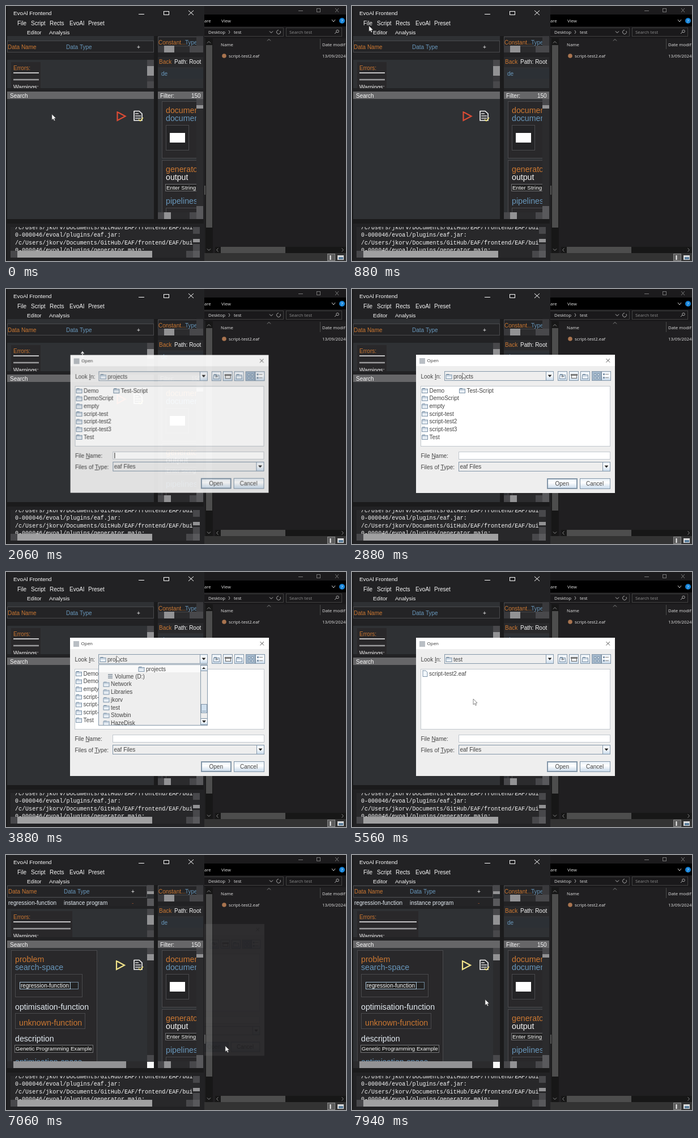
An HTML page with a canvas for the animation above (8000 ms loop, 600x450 px).

```html
<!DOCTYPE html>
<html lang="en">
<head>
<meta charset="utf-8">
<title>Opening a project</title>
<style>
  html, body { margin: 0; width: 100%; height: 100%; overflow: hidden; background: #1b1b1c; }
  canvas { display: block; width: 600px; height: 450px; }
</style>
</head>
<body>
<canvas id="stage" width="600" height="450"></canvas>
<script>
const LOOP = 8000;
const SANS = '"Liberation Sans", Arial, sans-serif';
const MONO = '"Liberation Mono", monospace';
const UI = '"Open Sans", sans-serif';
const ORANGE = '#cc7832', BLUE = '#6897bb', WHITE = '#f8f8f8';
const DARK = '#222224', PANEL = '#2f3134', CARD = '#29282a', EDGE = '#4a4a4d';
const THUMB = '#929294', TRACK = '#48484b', CORNER = '#59595c';
const STEEL = '#8497a9', PALE = '#c2c8ce', SELECT = '#a3b8cc', INK = '#444', ICON = '#7d93a8';

const screen = document.getElementById('stage').getContext('2d', { alpha: false });
const layer = Object.assign(document.createElement('canvas'), { width: 600, height: 450 }).getContext('2d');
let g = screen;

// Drawing helpers; boxes are given by two corners
function box(x0, y0, x1, y1, fill, edge, width = 1) {
  if (fill) { g.fillStyle = fill; g.fillRect(x0, y0, x1 - x0, y1 - y0); }
  if (edge) {
    g.strokeStyle = edge; g.lineWidth = width;
    g.strokeRect(x0 + .5, y0 + .5, x1 - x0 - 1, y1 - y0 - 1);
  }
}
function text(string, x, middle, color = WHITE, size = 10, family = SANS) {
  g.font = `${size}px ${family}`;
  g.fillStyle = color;
  g.fillText(string, x, middle + size * .36);
}
function line(points, color, width = 1, fill) {
  g.beginPath();
  for (let i = 0; i < points.length; i += 2) g.lineTo(points[i], points[i + 1]);
  if (fill) { g.closePath(); g.fillStyle = fill; g.fill(); }
  if (color) { g.strokeStyle = color; g.lineWidth = width; g.stroke(); }
}
function disc(x, y, r, color) {
  g.beginPath(); g.arc(x, y, r, 0, 7); g.fillStyle = color; g.fill();
}
function clipped(x0, y0, x1, y1, draw) {
  g.save(); g.beginPath(); g.rect(x0, y0, x1 - x0, y1 - y0); g.clip(); draw(); g.restore();
}
const chevron = (x, y, dx, dy, color = '#8a8a8a') =>
  line(dx ? [x - dx, y - 3, x + dx, y, x - dx, y + 3] : [x - 3, y - dy, x, y + dy, x + 3, y - dy], color);
const arrowDown = (x, y) => line([x - 3.5, y - 2, x + 3.5, y - 2, x, y + 2], null, 1, '#222');

function fileManager() {
  const label = (s, x, y, color = '#e4e4e4') => text(s, x, y, color, 7.8, UI);
  box(349, 0, 600, 450, '#201f21');
  box(349, 0, 600, 36, '#000');
  box(349, 0, 600, 15, '#1c1b1d');
  line([516, 8.5, 524, 8.5], '#777');
  box(548, 4, 555, 11, null, '#777');
  line([581, 4, 587, 11], '#777'); line([587, 4, 581, 11], '#777');
  label('are', 350, 26); label('View', 380, 26);
  chevron(578, 26, 0, 2, '#ccc');
  disc(593, 26, 5, '#1683d8'); label('?', 591.3, 26, '#fff');

  box(349, 36, 600, 57, '#1a191b');
  box(349, 38, 490, 54, '#1a191b', '#414141');
  box(494, 38, 593, 54, '#1a191b', '#414141');
  label('Desktop', 357, 46); chevron(394, 46, 1, 0, '#aaa'); label('test', 402, 46);
  chevron(468, 46, 0, 1.5, '#bbb');
  g.beginPath(); g.arc(481, 46, 3.5, -.6, 4.7); g.strokeStyle = '#aaa'; g.stroke();
  label('Search test', 500, 46, '#8e8e8e');
  g.beginPath(); g.arc(585, 44.5, 2.3, 0, 7); g.stroke();
  line([583, 46, 580, 49], '#aaa');

  chevron(464, 60, 0, -1.5);
  label('Name', 379, 68); label('Date modif', 558, 68);
  line([554.5, 58, 554.5, 76], '#4a4a4a');
  disc(385, 88, 3.8, '#a9744f');
  label('script-test2.eaf', 393, 88); label('13/09/2024', 558, 88);

  box(352, 57, 365, 436, '#171717');
  box(353, 69, 364, 391, '#4d4d4d');
  chevron(358, 64, 0, -1.5); chevron(358, 430, 0, 1.5);
  box(369, 425, 600, 436, '#171717');
  box(379, 425, 493, 436, '#4d4d4d');
  chevron(373, 430.5, -1.5, 0); chevron(594, 430.5, 1.5, 0);
  box(349, 436, 600, 450, '#333');
  box(567, 437, 581, 450, '#5c5c5c', '#888');
  line([572.5, 440, 572.5, 448], '#eee', 2);
  box(585, 440, 596, 448, '#ddd'); box(587, 443, 595, 447, '#5c7f9c');
  box(349, 317, 352, 333, '#555');
}

function cards(loaded) {
  box(2, 164, 261, 376, PANEL);
  if (loaded) {
    clipped(2, 164, 249, 364, () => {
      box(9, 168, 161, 380, CARD, EDGE);
      text('problem', 16, 184, ORANGE, 14.2);
      text('search-space', 16, 198, BLUE, 14.2);
      box(16, 210, 135, 251, null, EDGE);
      box(24, 224, 128, 237, '#222', '#6f8799');
      box(24, 224, 114, 237, null, '#a9c4d8');
      text('regression-function', 26, 230);
      text('optimisation-function', 16, 268, '#e3ebf2', 14.2);
      box(16, 279, 140, 307, null, EDGE);
      text('unknown-function', 23, 296, ORANGE, 14.2);
      text('description', 16, 324, '#e3ebf2', 14.2);
      box(15, 335, 154, 349, '#222', '#737376');
      text('Genetic Programming Example', 17, 342, WHITE, 9.7);
      text('optimisation-space', 16, 365, BLUE, 14.2);
    });
    box(249, 164, 261, 376, '#2b2b2d');
    box(249, 164, 261, 175, TRACK);
    box(249, 175, 261, 186, THUMB);
    box(249, 353, 261, 365, TRACK);
    box(2, 364, 249, 376, '#2b2b2d');
    box(13, 364, 212, 376, THUMB);
    box(249, 365, 261, 376, WHITE);
  }
  const x = loaded ? 195 : 196.5;
  line([x, 187, x + 14, 194.5, x, 202, x, 186], loaded ? '#f2e48a' : '#dc4b35', 2.2);
  line([226, 185.5, 235, 185.5, 240, 190, 240, 202, 226, 202, 226, 185], WHITE, 1.6);
  for (const y of [190, 194, 198]) line([228, y, y < 191 ? 234 : 238, y], WHITE, 1.3);
  line([234, 200, 237, 203, 242, 197], '#e8d96a', 1.5);
}

function table(loaded) {
  if (!loaded) {
    box(2, 53, 261, 82, PANEL);
    box(2, 61, 261, 82, '#242426', EDGE);
    text('Data Name', 3, 72, ORANGE); text('Data Type', 106, 72, BLUE); text('+', 231, 72);
    return;
  }
  box(2, 53, 261, 90, PANEL);
  box(2, 54, 249, 75, '#242426', EDGE);
  box(2, 76, 249, 90, '#242426');
  text('Data Name', 4, 64, ORANGE); text('Data Type', 102, 64, BLUE); text('+', 221, 64);
  text('regression-function', 4, 84, '#e3ebf2'); text('instance program', 102, 84, '#e3ebf2');
  text('-', 222, 84, '#94512f');
  box(249, 53, 261, 64, TRACK);
  box(249, 64, 261, 69, THUMB);
  box(249, 77, 261, 90, CORNER);
}

function mainWindow(loaded) {
  box(0, 0, 350, 450, DARK);
  box(0, 0, 2, 450, '#171718');
  text('EvoAl Frontend', 13, 12, WHITE, 9.8);
  line([234, 14.5, 244, 14.5], '#fff');
  box(278, 9, 288, 16, null, '#fff');
  line([322, 8, 331, 16], '#fff'); line([331, 8, 322, 16], '#fff');
  [['File', 20], ['Script', 44], ['Rects', 77], ['EvoAl', 112], ['Preset', 145]]
    .forEach(([s, x]) => text(s, x, 30));
  text('Editor', 37, 46, WHITE, 9.8); text('Analysis', 76, 46, WHITE, 9.8);
  box(261, 53, 268, 376, '#1b1b1c');
  table(loaded);

  const right = loaded ? 117 : 61;
  box(2, 95, 261, 145, PANEL);
  box(9, 99, right, 145, CARD);
  text('Errors:', 13, 109, ORANGE);
  line([13, 118, right - 3, 118], WHITE, 1.5);
  line([13, 130, right - 3, 130], '#9a9a9c', 2.4);
  clipped(2, 95, 249, 145, () => text('Warnings:', 13, 143));
  box(249, 95, 261, 145, '#39393c');
  box(249, 95, 261, 106, TRACK); box(249, 106, 261, 123, THUMB); box(249, 133, 261, 145, TRACK);

  box(2, 151, 261, 164, '#666668'); text('Search', 7, 158);
  cards(loaded);

  box(268, 53, 348, 82, '#2b2b2d');
  box(268, 54, 337, 71, '#242426', EDGE);
  clipped(268, 53, 336, 71, () => {
    text('Constant...', 269, 64, ORANGE); text('Type', 316, 64, BLUE);
  });
  box(336, 53, 348, 70, '#39393c');
  box(268, 70, 279, 82, '#39393c'); box(279, 70, 297, 82, THUMB); box(324, 70, 348, 82, TRACK);
  box(268, 90, 348, 108, '#29292b');
  text('Back', 270, 98, ORANGE); text('Path: Root', 297, 98);
  box(268, 108, 348, 145, PANEL);
  box(271, 111, 348, 128, '#2c3035'); text('de', 274, 119, BLUE);

  box(268, 151, 348, 164, '#666668'); text('Filter:', 272, 158); text('150', 327, 158);
  box(268, 164, 348, 376, PANEL);
  clipped(268, 164, 336, 364, () => {
    box(275, 168, 360, 269, CARD, EDGE);
    text('document', 282, 184, ORANGE, 14.2); text('document', 282, 198, BLUE, 14.2);
    box(282, 210, 323, 255, '#242426', EDGE); box(289, 224, 316, 241, '#fff');
    box(275, 272, 360, 380, CARD, EDGE);
    text('generator', 282, 288, ORANGE, 14.2); text('output', 282, 302, WHITE, 14.2);
    box(281, 314, 350, 327, '#222', '#707073'); text('Enter String', 283, 320.5, WHITE, 9.9);
    text('pipelines', 282, 344, BLUE, 14.2);
    box(282, 356, 350, 380, null, EDGE);
  });
  box(336, 164, 348, 376, '#2b2b2d');
  box(336, 164, 348, 175, TRACK); box(336, 175, 348, 181, THUMB);
  box(268, 364, 348, 376, '#2b2b2d');
  box(268, 364, 279, 376, TRACK); box(279, 364, 291, 376, THUMB);
  box(324, 364, 348, 376, TRACK); box(336, 353, 348, 376, CORNER);

  box(2, 376, 349, 384, '#1b1b1c');
  box(8, 390, 342, 444, '#28282a');
  clipped(8, 390, 330, 432, () => {
    const path = '/c/Users/jkorv/Documents/GitHub/EAF/frontend/EAF/bui';
    [path, '0-000046/evoal/plugins/eaf.jar:', path, '0-000046/evoal/plugins/generator.main:']
      .forEach((s, i) => text(s, 16, 390.5 + 13.3 * i, WHITE, 10.05, MONO));
  });
  box(330, 390, 342, 402, TRACK); box(330, 411, 342, 417, THUMB); box(330, 420, 342, 432, TRACK);
  box(8, 432, 20, 444, TRACK); box(20, 432, 258, 444, '#a0a0a1');
  box(318, 432, 330, 444, TRACK); box(330, 432, 342, 444, CORNER);
}

function fileMenu(cursorY) {
  const items = ['new', 'new from preset', 'open recent', 'open', 'save as ...', 'save', 'import ...', 'add generator to project'];
  const hover = Math.floor((cursorY - 40) / 14.35);
  box(16, 23, 41, 38, SELECT); text('File', 20, 30);
  box(16, 38, 136, 156, '#eee', STEEL);
  items.forEach((item, i) => {
    const y = 47 + 14.35 * i;
    if (i === hover) box(17, Math.round(y - 7), 135, Math.round(y + 7), SELECT);
    text(item, 21, y, INK);
  });
  line([129, 72.5, 132, 75.5, 129, 78.5], null, 1, '#222');
}

function folder(x, y) {
  box(x + 1, y - 4, x + 6, y, '#c9d6e2', ICON);
  box(x, y - 3, x + 11, y + 5, '#eaf0f6', ICON);
  line([x + 1, y - .5, x + 10, y - .5], '#b4c4d4');
}
function entry(name, x, y) { folder(x, y); text(name, x + 13.5, y, INK); }

function button(x0, y0, x1, y1, pressed) {
  const shade = g.createLinearGradient(0, y0, 0, y1);
  shade.addColorStop(0, '#e3ecf5'); shade.addColorStop(.4, '#fff'); shade.addColorStop(1, '#c4d7e9');
  box(x0, y0, x1, y1, pressed ? SELECT : shade, STEEL);
}
function combo(x0, y0, x1, y1) {
  box(x0, y0, x1, y1, '#eee', STEEL);
  button(x1 - 14, y0, x1, y1);
  arrowDown(x1 - 7, (y0 + y1) / 2);
}

function lookInList(cursorY) {
  box(163, 163, 356, 271, '#eee', STEEL);
  box(164, 164, 343, 177, '#fafafa');
  clipped(164, 164, 343, 270, () => {
    if (cursorY > 231) box(164, 232, 343, 246, SELECT);
    entry('projects', 233.5, 171);
    box(180, 180, 188, 188, '#9aa3ac');
    line([180, 182.5, 188, 182.5], '#e8eef4'); line([180, 185.5, 188, 185.5], '#e8eef4');
    text('Volume (D:)', 192, 184, INK);
    ['Network', 'Libraries', 'jkorv', 'test', 'Stowbin', 'HazeDisk']
      .forEach((s, i) => entry(s, 171.5, 197.7 + 13.75 * i));
  });
  box(343, 164, 356, 270, '#eee', STEEL);
  button(343, 164, 356, 175); button(343, 258, 356, 270);
  box(344, 233, 355, 249, '#cfdfee', STEEL);
  line([346, 171, 352, 171, 349, 168], null, 1, '#222'); arrowDown(349.5, 264);
  line([346, 245.5, 353, 245.5], STEEL);
}

function dialog(t, cursorY) {
  const inTest = t >= 4800, chosen = t >= 6150;
  box(113, 116, 464, 360, '#eee');
  box(113, 116, 464, 136, '#fff');
  box(119, 122, 129, 132, '#b9bec4');
  text('Open', 132.5, 126.5, '#333', 8, UI);
  line([448.5, 123, 455, 129.5], '#555'); line([455, 123, 448.5, 129.5], '#555');

  text('Look In:', 121.5, 154, INK); line([146, 159.5, 149, 159.5], INK);
  combo(163, 145, 356, 162);
  entry(inTest ? 'test' : 'projects', 165.5, 154);
  [363, 383, 403, 423, 440].forEach((x, i) => button(x, 145, x + 17, 162, i === 3));
  folder(366, 154); line([371, 156, 371, 152.5, 374, 155], '#555');
  box(387, 152, 397, 158, '#f4f4f4', '#666'); box(386, 150, 398, 153, '#999', '#666');
  folder(406, 154);
  for (const x of [427, 433]) for (const y of [149, 155]) box(x, y, x + 4, y + 4, '#e4edf5', ICON);
  for (const y of [150, 156]) { box(443, y - 1, 446, y + 2, ICON); line([447, y + .5, 453, y + .5], '#888'); }

  box(121, 171, 456, 278, '#fff', PALE);
  if (inTest) {
    if (chosen) box(135, 173, 204, 186, '#b8cfe5');
    line([125, 174, 130, 174, 133, 177, 133, 184.5, 125, 184.5, 125, 173.5], ICON, 1, '#f2f7fc');
    text('script-test2.eaf', 136, 179, INK);
  } else {
    ['Demo', 'DemoScript', 'empty', 'script-test', 'script-test2', 'script-test3', 'Test']
      .forEach((s, i) => entry(s, 123, 179 + 13.65 * i));
    entry('Test-Script', 189, 179);
  }

  text('File Name:', 121.5, 294, INK); line([140.5, 299.5, 147, 299.5], INK);
  box(188, 287, 456, 301, '#fff', PALE);
  if (chosen) text('script-test2.eaf', 191, 294, INK);
  else if (t < 2500) line([191.5, 289, 191.5, 299], '#222');
  text('Files of Type:', 121.5, 314, INK); line([156, 319.5, 162, 319.5], INK);
  combo(188, 305, 456, 322);
  text('eaf Files', 190.5, 313.5, INK);
  button(344, 334, 398, 353, t > 6820); box(345, 335, 397, 352, null, STEEL);
  text('Open', 358.5, 343.5, INK);
  button(402, 334, 456, 353); text('Cancel', 413, 343.5, INK);
  if (t >= 3300 && !inTest) lookInList(cursorY);
}

function fadedDialog(t, amount, cursorY) {
  g = layer;
  g.clearRect(0, 0, 600, 450);
  dialog(t, cursorY);
  g = screen;
  const scale = .95 + .05 * amount;
  g.save();
  g.globalAlpha = amount;
  g.translate(288.5, 238); g.scale(scale, scale); g.translate(-288.5, -238);
  g.drawImage(layer.canvas, 0, 0);
  g.restore();
}

// time, x, y of the pointer
const stops = [
  [0, 81, 191], [350, 81, 191], [950, 28, 29], [1250, 28, 30], [1700, 45, 86], [1900, 45, 86],
  [2060, 135, 116], [2900, 195, 148], [4000, 195, 148], [4550, 195, 237], [4850, 195, 237],
  [5250, 214, 224], [5600, 214, 224], [6000, 165, 178], [6200, 165, 178], [6650, 387, 337],
  [7080, 387, 337], [7650, 235, 255], [8000, 235, 255]
];
function pointerAt(t) {
  const i = stops.findIndex(s => s[0] > t);
  const [t0, x0, y0] = stops[i - 1], [t1, x1, y1] = stops[i];
  const p = (t - t0) / (t1 - t0), ease = p * p * (3 - 2 * p);
  return [x0 + (x1 - x0) * ease, y0 + (y1 - y0) * ease];
}
function pointer(x, y, resizing) {
  g.save();
  g.translate(x, y);
  if (resizing) line([-2.5, -2, 0, -5, 2.5, -2, 0, -5, 0, 5, -2.5, 2, 0, 5, 2.5, 2], WHITE, 1.2);
  else line([0, 0, 0, 10, 2.3, 8, 4, 11.5, 5.6, 10.7, 4, 7.3, 7, 7, 0, 0], '#555', .7, '#fff');
  g.restore();
}

function draw(now) {
  const t = now % LOOP, [x, y] = pointerAt(t);
  const closing = t >= 6920;
  const shown = Math.max(0, Math.min(1, (t - 1920) / 150, (7070 - t) / 150));
  fileManager();
  // The main window comes to the front as the dialog closes
  if (closing && shown) fadedDialog(t, shown, y);
  mainWindow(closing);
  if (t >= 1150 && t < 1900) fileMenu(y);
  if (!closing && shown) fadedDialog(t, shown, y);
  pointer(x, y, t > 2030 && t < 2110);
  requestAnimationFrame(frame);
}
let start;
function frame(now) { start ??= now; draw(Math.max(0, now - start)); }
requestAnimationFrame(frame);
</script>
</body>
</html>
```
